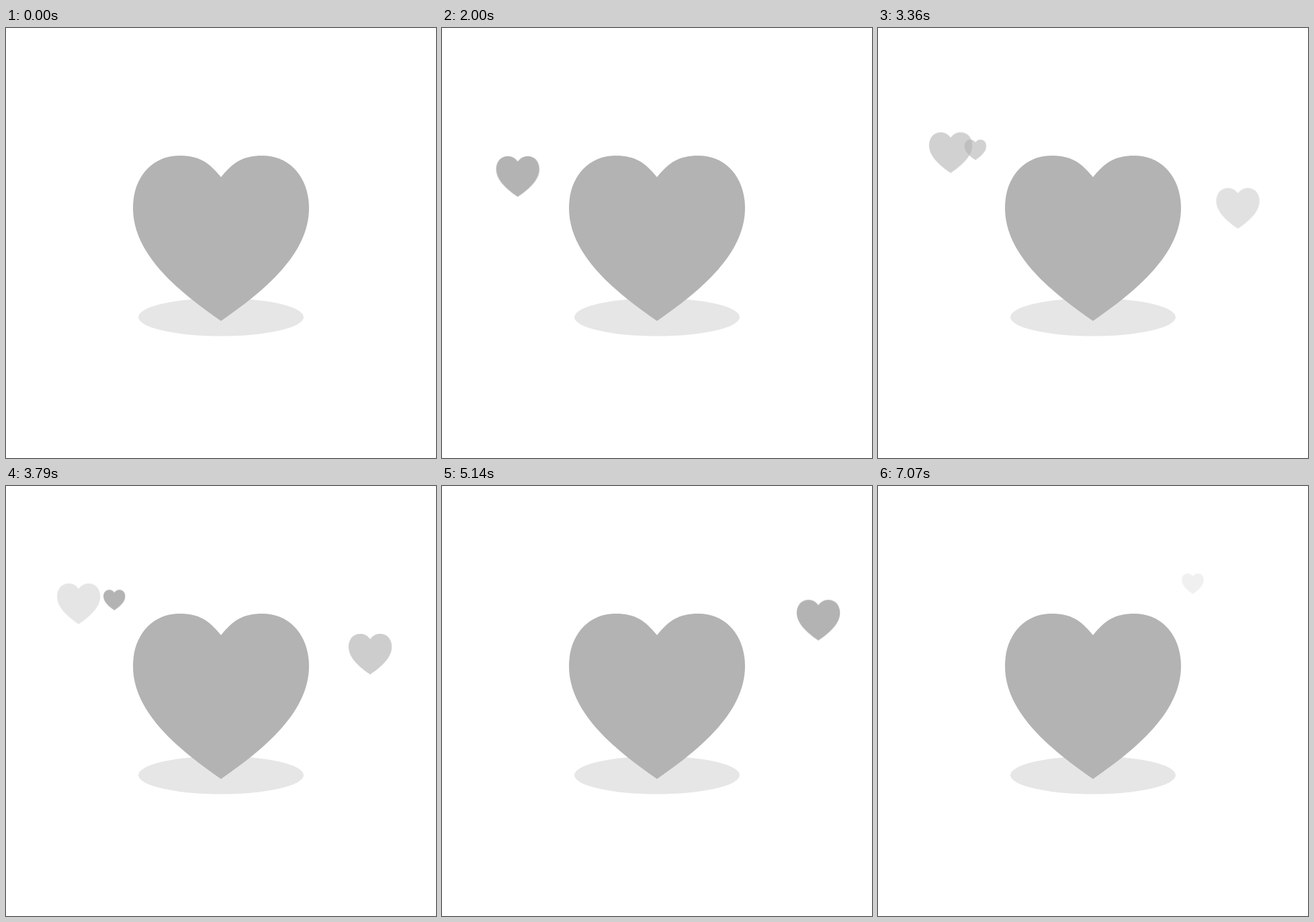
Recreate the animation shown at these times as an HTML page without scripts. Size 640 by 640 pixels, loop 8000 ms.

```html
<!DOCTYPE html>
<html lang="en">
<head>
<meta charset="utf-8">
<title>Floating hearts</title>
<style>
  html, body { margin: 0; width: 100%; height: 100%; overflow: hidden; background: #fff; }
  svg { display: block; width: 100%; height: 100%; }
  .float { opacity: 0; animation: 8s linear infinite; }
  .left { animation-name: left; }
  .right { animation-name: right; }
  .mini-left { animation-name: mini-left; }
  .mini-right { animation-name: mini-right; }

  @keyframes left {
    0%, 9.87% { opacity: 0; }
    9.875% { opacity: .3; transform: translate(96.6px, 231.2px); }
    24.125%, 34.0625% { opacity: 1; }
    29.375% { transform: translate(76px, 179.2px); }
    54.25%, 100% { opacity: 0; transform: translate(76px, 132.2px); }
  }
  @keyframes right {
    0%, 33.875% { opacity: 0; transform: translate(493.8px, 265.8px); }
    54.375%, 64.25% { opacity: 1; }
    59.625% { transform: translate(524.4px, 178.6px); }
    84.375%, 100% { opacity: 0; transform: translate(543.8px, 129.9px); }
  }
  @keyframes mini-left {
    0%, 33.875% { opacity: 0; transform: translate(104px, 183.7px); }
    47.375% { opacity: 1; }
    60.875%, 100% { opacity: 0; transform: translate(186px, 125.3px); }
  }
  @keyframes mini-right {
    0%, 63.875% { opacity: 0; transform: translate(526.8px, 183px); }
    77.5% { opacity: 1; }
    88.375%, 100% { opacity: .2; transform: translate(452.3px, 130.3px); }
  }
</style>
</head>
<body>
<svg viewBox="0 0 640 640" fill="#b3b3b3">
  <defs>
    <path id="heart" d="M131 32C113 10 99 0 69 0C29 0 0 32 0 78C0 145 64 200 131 246C198 200 262 145 262 78C262 32 233 0 193 0C163 0 149 10 131 32Z"/>
    <use id="small" href="#heart" transform="scale(.2455)"/>
    <use id="mini" href="#heart" transform="scale(.1237)"/>
  </defs>
  <ellipse cx="320" cy="430.3" rx="123" ry="28.3" fill="#e6e6e6"/>
  <use href="#heart" x="189" y="190"/>
  <g class="float left"><use href="#small"/></g>
  <g class="float right"><use href="#small"/></g>
  <g class="float mini-left"><use href="#mini"/></g>
  <g class="float mini-right"><use href="#mini"/></g>
</svg>
</body>
</html>
```
